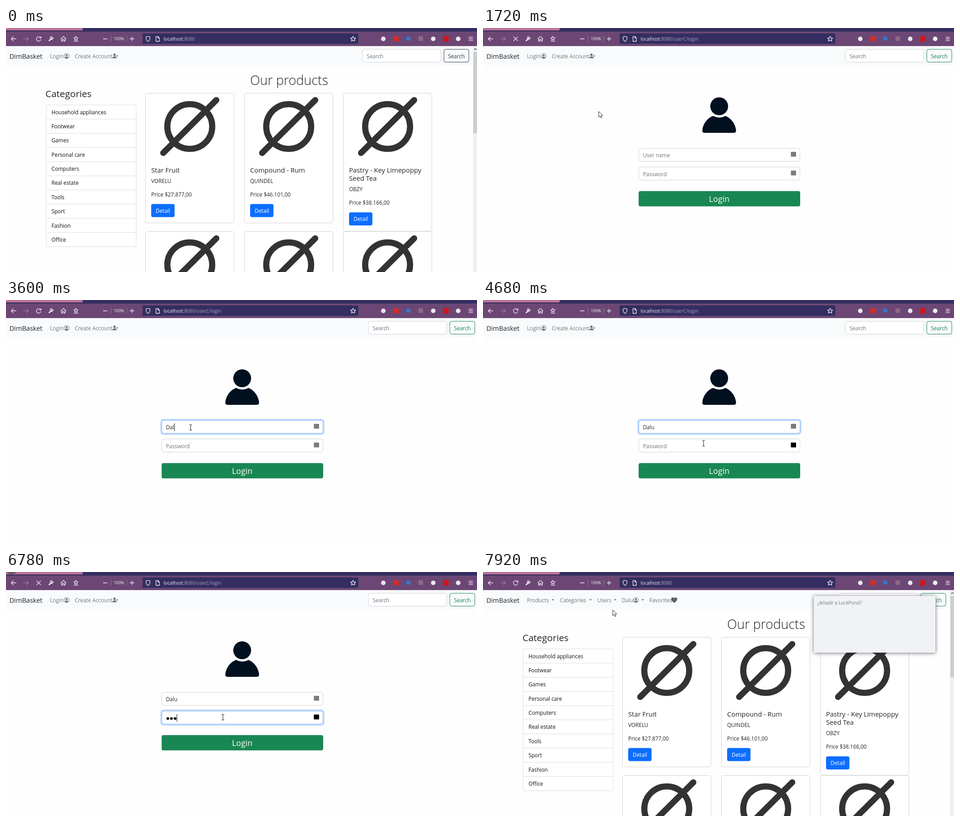
Animation, 1038 px wide and 540 px high, one loop 7990 ms. Source, as an HTML page:

```html
<!DOCTYPE html>
<html lang="en">
<head>
<meta charset="utf-8">
<title>Shop login</title>
<style>
html, body { margin: 0; width: 100%; height: 100%; overflow: hidden; background: #fefefe; }
svg { display: block; width: 100vw; height: 100vh; }
text { font-family: "Open Sans", "Noto Sans", sans-serif; white-space: pre; }
.line { fill: none; stroke: #f1e9f3; stroke-width: 1.3; stroke-linecap: round; stroke-linejoin: round; }
#popup rect { filter: drop-shadow(0 1px 4px rgba(0, 0, 0, .55)); }
</style>
</head>
<body>
<svg id="stage" viewBox="0 0 1038 540"></svg>
<script>
const LOOP = 7990;
const INK = '#212529', MUTED = '#737678', HINT = '#6c757d', GREEN = '#198754', NAVY = '#2b3a4f';
const LOGIN_AT = 1700, HOME_AT = 6800, POPUP_AT = 7850;
const NAME = 'Dalu';
const NAME_KEYS = [3000, 3330, 3530, 3660];
const PASS_KEYS = [5640, 5840, 6040];
const USER_FOCUS = 2480, PASS_FOCUS = 4940;

const text = (x, y, s, size = 11.7, fill = INK, more = '') =>
  `<text x="${x}" y="${y}" font-size="${size}" fill="${fill}" ${more}>${s}</text>`;
const rect = (x, y, w, h, fill, stroke = 'none', r = 0, more = '') =>
  `<rect x="${x}" y="${y}" width="${w}" height="${h}" fill="${fill}" stroke="${stroke}" rx="${r}" ${more}/>`;
const dot = (x, y, r, fill, more = '') => `<circle cx="${x}" cy="${y}" r="${r}" fill="${fill}" ${more}/>`;
const path = (d, more = '') => `<path d="${d}" ${more}/>`;
const line = (d, more = '') => path(d, `class="line" ${more}`);
const group = (id, body, more = '') => `<g id="${id}" ${more}>${body}</g>`;

function toolbar() {
  return rect(0, 0, 1038, 8, '#342f62') + rect(0, -4, 169, 9.5, '#bd7396', 'none', 2)
    + dot(12, -6, 12, '#6d5967', 'id="busy"')
    + rect(0, 8, 1038, 32, '#6c4775')
    + line('M22 24H11.5M16 19.5L11.5 24L16 28.5')
    + line('M39 24H49.5M45 19.5L49.5 24L45 28.5', 'opacity=".35"')
    + group('reload', line('M76.2 21.3A5 5 0 1 0 77 25M77 18.8V22.2H73.4'))
    + group('stop', line('M67.7 19.7L76.3 28.3M76.3 19.7L67.7 28.3'))
    + line('M95.3 28L100.5 22.8', 'style="stroke-width:2.6"')
    + line('M104 21.3A3.3 3.3 0 1 1 100.8 18.7L100.5 21.6L102 22.8Z')
    + line('M121 24L126.5 18.7L132 24M122.5 23V29H125V25.5H128V29H130.5V23')
    + line('M154 18.3L155.4 21.2L158.6 21.6L156.3 23.8L156.8 26.5L154 25.2L151.2 26.5L151.7 23.8L149.4 21.6L152.6 21.2ZM150 29H158')
    + line('M214.5 24H223M273.5 24H282M277.7 19.7V28.3')
    + line('M231.5 18V30M266.5 18V30', 'opacity=".3" style="stroke-width:1"')
    + text(237.5, 27.3, '100%', 9.1, '#f7f1f8')
    + rect(301, 12, 475.5, 23, '#332f60', 'none', 2.5)
    + line('M313 18.3L317.5 20C317.7 25 316 28 313 29.8C310 28 308.3 25 308.5 20Z')
    + line('M330.5 19H335L338 22V29.5H330.5ZM335 19V22H338')
    + line('M765 18.3L766.7 22L770.6 22.4L767.7 25L768.5 29L765 27L761.5 29L762.3 25L759.4 22.4L763.3 22Z')
    + `<text x="347.5" y="28" font-size="10.2" fill="#f5f2fa">localhost<tspan id="tail" fill="#a9a4c0"></tspan></text>`
    + dot(831.5, 24, 5, '#eee6f0') + rect(853.5, 18.5, 12, 11, '#d32d27')
    + dot(886.5, 23.5, 5, '#2f7bd0') + rect(909, 18.5, 10, 10, '#8a6a86')
    + dot(941.5, 24, 5, '#efe7f1') + rect(963.5, 18, 12, 12, '#cf1616') + dot(996.5, 24, 5, '#f3edf4')
    + line('M1020 20.3H1028.5M1020 24H1028.5M1020 27.7H1028.5');
}

const personCircle = (x, y) =>
  dot(x, y, 5.5, 'none', 'stroke="currentColor" stroke-width="1.1"') + dot(x, y - 1.2, 2.3, 'currentColor')
  + path(`M${x - 4.4} ${y + 3.6}Q${x} ${y - .8} ${x + 4.4} ${y + 3.6}Q${x} ${y + 7.6} ${x - 4.4} ${y + 3.6}Z`, 'fill="currentColor"');

const guestNav = () =>
  group('loginLink', text(97, 66.5, 'Login', 11.7, 'currentColor') + personCircle(133.5, 62))
  + text(151.7, 66.5, 'Create Account', 11.7, MUTED)
  + dot(239, 59.2, 2.7, MUTED) + path('M234.2 67Q234.4 62.8 239 62.8Q243.6 62.8 243.8 67Z', `fill="${MUTED}"`)
  + path('M244.8 59.3V64.3M242.3 61.8H247.3', `stroke="${MUTED}" stroke-width="1.1"`);

function memberNav() {
  const items = [[97, 'Products', 154], [169.5, 'Categories', 237], [252, 'Users', 291], [306, NAME, 352]];
  return items.map(([x, s, c]) => text(x, 66.5, s, 11.7, MUTED)
      + path(`M${c - 3} 60.2H${c + 3}L${c} 63.3Z`, `fill="${MUTED}"`)).join('')
    + `<g color="${MUTED}">${personCircle(337, 62)}</g>`
    + text(367, 66.5, 'Favorites', 11.7, MUTED)
    + path('M421.5 68.3C409 60 417.5 52.5 421.5 58.2C425.5 52.5 434 60 421.5 68.3Z', 'fill="#5c5f62"');
}

const search = (x, color, id) =>
  rect(x + .5, 47.2, 173, 28.3, '#fff', '#d0d5da', 4) + text(x + 10, 66.5, 'Search', 11.7, HINT)
  + `<g id="${id}" color="${color}">` + rect(x + 180, 47.2, 55, 28.3, 'none', 'currentColor', 4)
  + text(x + 207.5, 66.5, 'Search', 11.7, 'currentColor', 'text-anchor="middle"') + '</g>';

function card(x, y, title, brand, price) {
  const low = (title.length - 1) * 18.4;
  const cx = x + 98, cy = y + 74;
  return rect(x + .5, y + .3, 195, 287 + low, '#fff', '#d3d3d3', 4)
    + `<g fill="none" stroke="#333" stroke-width="13.5" stroke-linecap="round">`
    + `<circle cx="${cx}" cy="${cy}" r="49.5"/><path d="M${cx - 58.5} ${cy + 58.5}L${cx + 58.5} ${cy - 58.5}"/></g>`
    + title.map((s, i) => text(x + 13, y + 175.6 + 18.4 * i, s, 14.7)).join('')
    + text(x + 13, y + 198.5 + low, brand) + text(x + 13, y + 229 + low, 'Price $' + price)
    + rect(x + 13, y + 245.5 + low, 51.5, 29, '#0d6efd', 'none', 4)
    + text(x + 38.8, y + 265 + low, 'Detail', 11.7, '#fff', 'text-anchor="middle"');
}

function homePage() {
  const names = ['Household appliances', 'Footwear', 'Games', 'Personal care', 'Computers',
    'Real estate', 'Tools', 'Sport', 'Fashion', 'Office'];
  const step = 31.37;
  const list = names.map((s, i) => text(100.3, 190.6 + step * i, s, 11.7, '#111')
    + (i ? path(`M88 ${170.3 + step * i}H287`, 'stroke="#dcdcdc"') : '')).join('');
  const goods = [
    [['Star Fruit'], 'VORELU', '27.877,00'],
    [['Compound - Rum'], 'QUINDEL', '46.101,00'],
    [['Pastry - Key Limepoppy', 'Seed Tea'], 'OBZY', '38.166,00']];
  return group('guest', guestNav.call()) .replace('id="loginLink"', 'id="homeLogin"')
    + group('member', memberNav()) + search(785, NAVY, 'searchBtn')
    + text(538, 126, 'Our products', 28.6, INK, 'font-weight="300"')
    + text(87, 153, 'Categories', 20.5)
    + rect(88.5, 170.3, 198.5, step * 10, '#fff', '#dcdcdc', 4) + list
    + goods.map((g, i) => card(307 + 218 * i, 144, ...g) + card(307 + 218 * i, 450, ...g)).join('')
    + rect(1029, 40, 9, 500, '#f0f0f0') + rect(1030, 53, 8, 180, '#cdcdcd')
    + path('M1031.3 48.5L1034.3 45.3L1037.3 48.5', 'fill="none" stroke="#555" stroke-width="1.3"')
    + group('popup', rect(729, 53, 268, 125.5, '#f0f2f6') + text(737, 72, '¿Añadir a LockPond?', 10.2, '#74787e'));
}

const field = (id, y, hint) =>
  rect(343.5, y, 355, 28.8, '#fff', '#ced4da', 4)
  + group(id + 'Glow', rect(341.8, y - 1.7, 358.4, 32.2, 'none', '#c2dbfe', 5.5, 'stroke-width="3.4"')
    + rect(343.5, y, 355, 28.8, 'none', '#86b7fe', 4))
  + text(352.5, y + 19.8, hint, 11.7, HINT, `id="${id}Hint"`)
  + rect(678.5, y + 7.7, 11.5, 10.8, '#7c7c7c', 'none', 1, `id="${id}Badge"`)
  + rect(353, y + 6.7, 1, 17, '#111', 'none', 0, `id="${id}Caret"`);

const loginPage = () =>
  `<g color="${MUTED}">${guestNav()}</g>` + search(798, GREEN, 'loginSearch')
  + dot(520.5, 173.2, 19.7, '#00101f')
  + path('M488 232Q483 232 483.3 226.5C485 211 495 199 507 194.5Q520.5 202 534 194.5C546 199 556 211 557.7 226.5Q558 232 553 232Z', 'fill="#00101f"')
  + field('user', 266.3, 'User name') + text(352.5, 286, '', 11.7, INK, 'id="typed"')
  + field('pass', 307.7, 'Password')
  + PASS_KEYS.map((k, i) => dot(356.6 + 8 * i, 324.2, 3, '#111', `id="bullet${i}"`)).join('')
  + rect(343, 361, 356, 33.7, GREEN, 'none', 4, 'id="submit"')
  + text(520.5, 384.8, 'Login', 17.8, '#fff', 'text-anchor="middle"');

const pointers =
  group('arrow', path('M0 0V12.6L2.9 9.9L4.9 14.4L6.9 13.5L5 9.2H8.8Z', 'fill="#fff" stroke="#111" stroke-width=".9"'))
  + group('beam', path('M-2.8 -6H-.7L0 -5.4L.7 -6H2.8M0 -5.4V5.4M-2.8 6H-.7L0 5.4L.7 6H2.8', 'fill="none" stroke="#222" stroke-width="1.1"'))
  + group('hand', path('M-1.2 0.5Q0 -1 1.2 .5V5L5.5 6Q7 6.4 6.8 8L6 13.5H-1L-4.5 8.6Q-4 6.8 -1.2 8.6Z', 'fill="#fff" stroke="#111" stroke-width=".9"'));

document.getElementById('stage').innerHTML = rect(0, 0, 1038, 540, '#fefefe') + rect(0, 40, 1038, 42.3, '#f8fafb')
  + text(7.5, 67.8, 'DimBasket', 14.5)
  + group('home', homePage()) + group('login', loginPage()) + toolbar() + group('pointer', pointers);

const el = {};
document.querySelectorAll('[id]').forEach(n => el[n.id] = n);
const show = (n, on) => n.style.display = on ? '' : 'none';
const set = (n, key, value) => n.setAttribute(key, value);
const ramp = (t, from, span = 150) => Math.min(1, Math.max(0, (t - from) / span));
const between = (t, a, b) => t >= a && t < b;

// Pointer waypoints: time, x, y
const WAY = [[0, 480, 284], [240, 480, 284], [1030, 121, 60], [1230, 122, 61], [1510, 158, 99], [1860, 320, 240],
  [2180, 411, 308], [2460, 407, 282], [4270, 407, 282], [4680, 486, 317], [4820, 488, 364],
  [5000, 478, 321.5], [7400, 478, 321.5], [7920, 286, 84], [LOOP, 286, 84]];

function slope(i, k) {
  const a = WAY[i - 1], b = WAY[i], c = WAY[i + 1];
  const rest = (p, q) => !p || !q || p[1] === q[1] && p[2] === q[2];
  return rest(a, b) || rest(b, c) ? 0 : (c[k] - a[k]) / (c[0] - a[0]);
}

function pointerAt(t) {
  let i = 0;
  while (i < WAY.length - 2 && t >= WAY[i + 1][0]) i++;
  const a = WAY[i], b = WAY[i + 1], d = b[0] - a[0], u = (t - a[0]) / d, v = 1 - u;
  return [1, 2].map(k => v * v * (1 + 2 * u) * a[k] + u * u * (3 - 2 * u) * b[k]
    + d * u * v * (v * slope(i, k) - u * slope(i + 1, k)));
}

function draw(t) {
  const onLogin = between(t, LOGIN_AT, HOME_AT), member = t >= HOME_AT;
  const [x, y] = pointerAt(t);
  const inside = (l, top, r, b) => x >= l && x <= r && y >= top && y <= b;

  show(el.home, !onLogin);
  show(el.login, onLogin);
  show(el.guest, !member);
  show(el.member, member);
  show(el.popup, t >= POPUP_AT);
  set(el.searchBtn, 'color', t >= POPUP_AT ? GREEN : NAVY);
  set(el.homeLogin, 'color', between(t, 940, LOGIN_AT) ? '#26292c' : MUTED);

  const loading = between(t, 1120, 1910) || between(t, 6500, 7450);
  show(el.reload, !loading);
  show(el.stop, loading);
  set(el.stop, 'opacity', t >= HOME_AT ? .4 : 1);
  show(el.busy, between(t, 6500, 7310));
  el.tail.textContent = ':8080' + (between(t, 1240, HOME_AT) ? '/userC/login' : '');

  const typed = NAME_KEYS.filter(k => t >= k).length;
  const hidden = PASS_KEYS.filter(k => t >= k).length;
  el.typed.textContent = NAME.slice(0, typed);
  show(el.userHint, !typed);
  show(el.passHint, !hidden);
  PASS_KEYS.forEach((k, i) => show(el['bullet' + i], i < hidden));
  set(el.userGlow, 'opacity', ramp(t, USER_FOCUS) - ramp(t, PASS_FOCUS));
  set(el.passGlow, 'opacity', ramp(t, PASS_FOCUS));
  show(el.userCaret, between(t, USER_FOCUS, 4070));
  set(el.userCaret, 'x', 353 + (typed && onLogin ? el.typed.getComputedTextLength() : 0));
  show(el.passCaret, between(t, PASS_FOCUS, 5420) || t >= PASS_KEYS[0]);
  set(el.passCaret, 'x', 353 + (hidden ? 8 * hidden - .8 : 0));

  const overPass = onLogin && inside(343, 308, 699, 337);
  const overSubmit = onLogin && inside(343, 361, 699, 395);
  set(el.passBadge, 'fill', overPass && t > 4270 ? '#000' : '#7c7c7c');
  set(el.submit, 'fill', overSubmit ? '#157347' : GREEN);

  const beam = overPass || onLogin && inside(343, 266, 699, 295);
  const hand = overSubmit || t < LOGIN_AT && inside(97, 50, 141, 75);
  show(el.pointer, t >= 70);
  show(el.beam, beam);
  show(el.hand, hand);
  show(el.arrow, !beam && !hand);
  set(el.pointer, 'transform', `translate(${x.toFixed(1)} ${y.toFixed(1)})`);
}

const start = performance.now();
function tick() {
  draw((performance.now() - start) % LOOP);
  requestAnimationFrame(tick);
}
tick();
</script>
</body>
</html>
```
